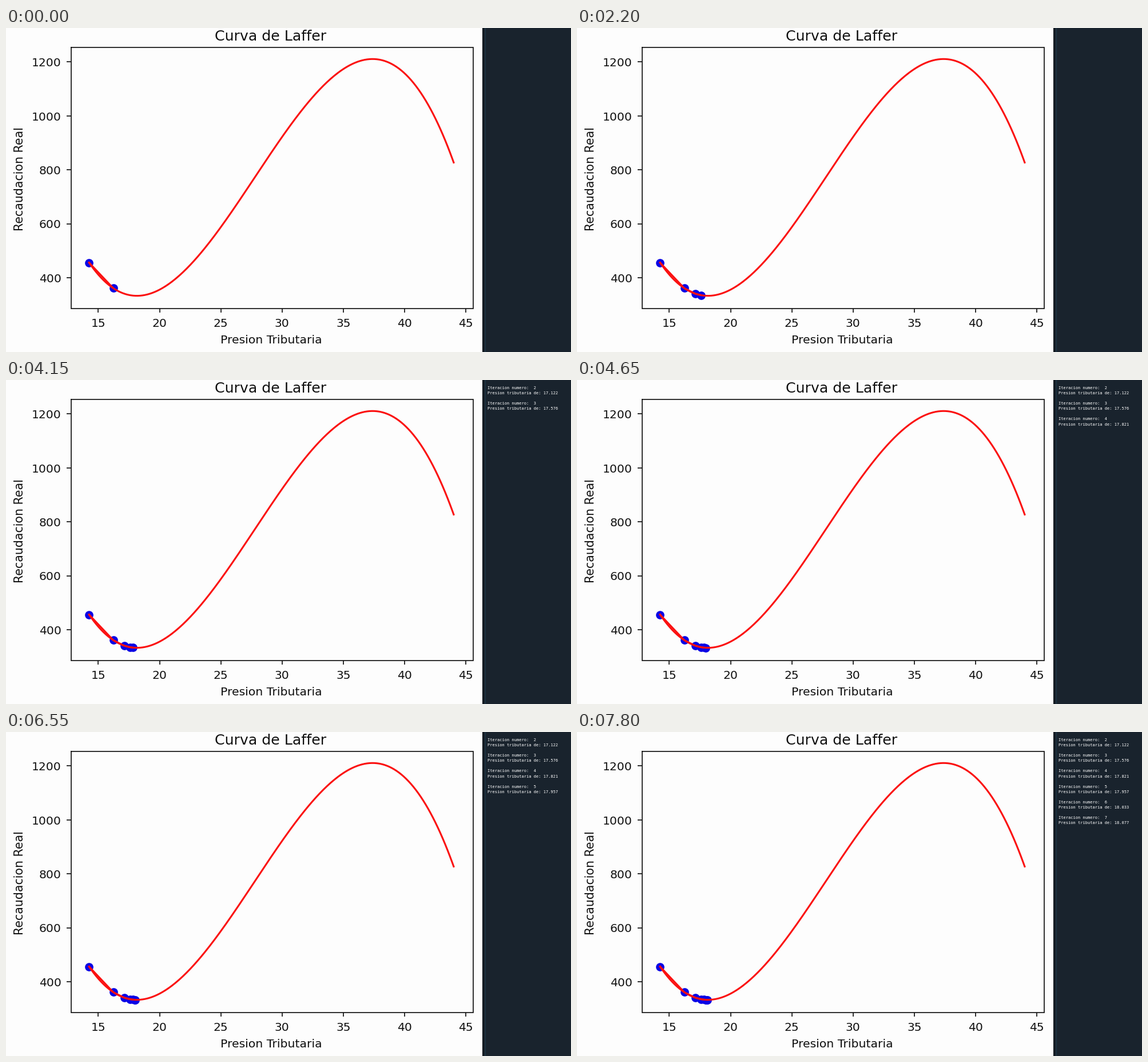
A matplotlib script that plays this animation: 988 px wide and 567 px high, repeating every 8 s.

```python
import numpy as np
import matplotlib.pyplot as plt
from matplotlib.animation import FuncAnimation
from matplotlib.patches import Rectangle

W, H, DPI = 988, 567, 64
STEP, LOOP = 50, 8000
PT = 72 / DPI  # points per pixel

LEFT, RIGHT, TOP, BOTTOM = 113.5, 816.5, 33.5, 490.5
INK, PAPER, RED, BLUE = "#101010", "#fdfdfd", "#fb1010", "#0a05e6"
PANEL = "#19232d"

# Descent steps and the time (ms) at which each one is plotted
STEPS = np.array([14.25, 16.22, 17.122, 17.576, 17.821,
                  17.957, 18.033, 18.077, 18.101])
SHOWN_AT = np.array([0, 0, 1150, 2200, 3200, 4250, 5350, 6600, 7650])
FIRST_LOGGED = 2
PRINT_DELAY = 50


def revenue(x, low=18.15, high=37.38, bottom=333, top=1210):
    """Cubic with its minimum at low and its maximum at high."""
    u = (x - low) / (high - low)
    return bottom + (top - bottom) * u * u * (3 - 2 * u)


def px(x):
    return 161.4 + (np.asarray(x) - 15) * 21.43


def py(y):
    return 437 - (np.asarray(y) - 400) * 0.4725


fig = plt.figure(figsize=(W / DPI, H / DPI), dpi=DPI, facecolor=PANEL)
ax = fig.add_axes([0, 0, 1, 1])
ax.set_xlim(0, W)
ax.set_ylim(H, 0)
ax.axis("off")


def box(x, y, w, h, color):
    ax.add_patch(Rectangle((x, y), w, h, facecolor=color, lw=0, zorder=0))


def line(xs, ys, color=INK, width=1.7, **kw):
    return ax.plot(xs, ys, color=color, lw=width * PT, **kw)[0]


def label(x, y, text, size, ha="center", color=INK, **kw):
    return ax.text(x, y, text, fontsize=size * PT, ha=ha, va="baseline",
                   color=color, **kw)


def build_chart():
    box(0, 0, 832.5, H, PAPER)
    line([LEFT, RIGHT, RIGHT, LEFT, LEFT], [TOP, TOP, BOTTOM, BOTTOM, TOP],
         solid_joinstyle="miter", zorder=4)
    for v in range(15, 50, 5):
        line([px(v)] * 2, [BOTTOM, BOTTOM + 7.3], solid_capstyle="butt")
        label(px(v), 523, str(v), 20.2)
    for v in range(400, 1400, 200):
        line([LEFT - 7.3, LEFT], [py(v)] * 2, solid_capstyle="butt")
        label(96.5, py(v) + 8, str(v), 20.2, ha="right")
    label(463, 22, "Curva de Laffer", 25.3, family="DejaVu Sans")
    label(464, 552, "Presion Tributaria", 20.4)
    label(30, 264, "Recaudacion Real", 20.5, rotation=90,
          rotation_mode="anchor")
    x = np.linspace(14.25, 44, 300)
    line(px(x), py(revenue(x)), RED, 3.1, zorder=3)


def build_console():
    box(832.5, 0, 2.5, H, "#0e141a")
    box(838, 0, 1, H, "#1d3a4c")
    log = []
    for row, n in enumerate(range(FIRST_LOGGED, len(STEPS) - 1)):
        lines = (f"Iteracion numero:  {n}",
                 f"Presion tributaria de: {STEPS[n]:.3f}")
        y = 16.2 + row * 27.15
        log.append([label(842, y + i * 9.05, s, 7.04, ha="left",
                          color="white", family="DejaVu Sans Mono")
                    for i, s in enumerate(lines)])
    return log


build_chart()
log = build_console()
trail = line([], [], RED, 3.1, zorder=3)
dots = line([], [], BLUE, 0, ls="none", marker="o", ms=12.6 * PT,
            mew=2.1 * PT, zorder=2)


def update(i):
    t = i * STEP
    x = STEPS[SHOWN_AT <= t]
    for artist in (trail, dots):
        artist.set_data(px(x), py(revenue(x)))
    for pair, shown in zip(log, SHOWN_AT[FIRST_LOGGED + 1:]):
        for text in pair:
            text.set_visible(t >= shown + PRINT_DELAY)
    return [trail, dots, *(text for pair in log for text in pair)]


anim = FuncAnimation(fig, update, frames=LOOP // STEP, interval=STEP,
                     init_func=lambda: update(0), repeat=True,
                     repeat_delay=0, blit=False)
plt.show()
```
